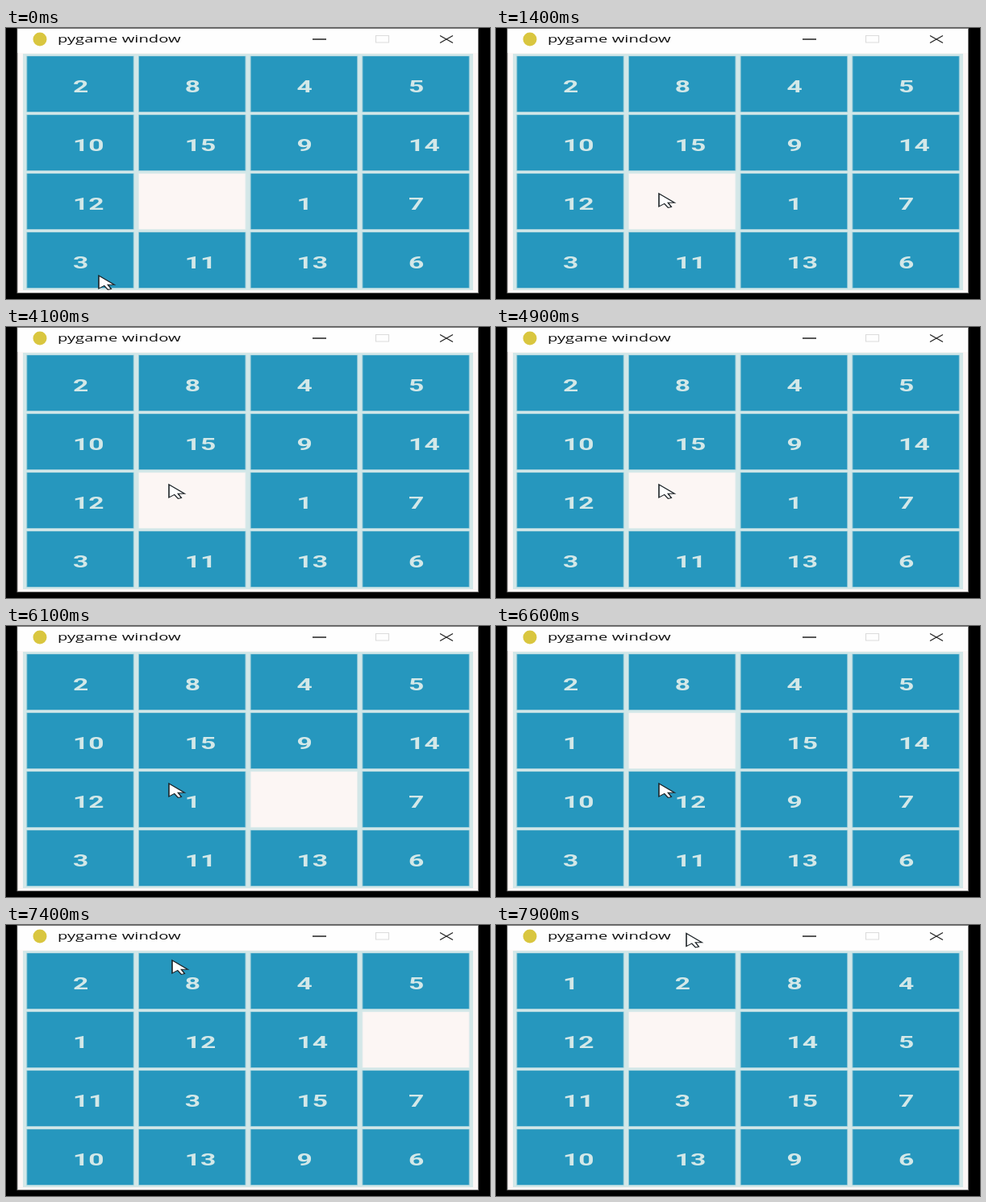
An HTML page with a canvas for the animation above (8 s loop, 600x337 px).

```html
<!DOCTYPE html>
<html lang="en">
<head>
<meta charset="utf-8">
<title>Sliding puzzle</title>
<style>
  html, body { margin: 0; width: 100%; height: 100%; overflow: hidden; background: #000; }
  canvas { display: block; }
</style>
</head>
<body>
<canvas id="stage" width="600" height="337"></canvas>
<script>
const ctx = document.getElementById('stage').getContext('2d');
const LOOP = 8000, STEP = 100;
const WIDE = 1.68; // the whole window is shown wider than it is tall

// Puzzle: rows of the start position (0 is empty) and the moves of the empty cell
const START = '2 8 4 5  10 15 9 14  12 0 1 7  3 11 13 6'.split(/ +/).map(Number);
const MOVES = 'RULDLUR' + 'DDLURDRUUR' + 'ULLLDR';
const SHIFT = { U: -4, D: 4, L: -1, R: 1 };
const MOVE_START = 5990, MOVE_TIME = 82;

// Pointer: home, then glides to further points; it is out of sight in the second glide
const HOME = { x: 115, y: 308 };
const GLIDES = [
  { from: 200, to: 1400, x: 202, y: 206 },
  { from: 2300, to: 4100, x: 202, y: 196, hidden: true },
  { from: 6700, to: 7400, x: 206, y: 44 },
  { from: 7400, to: 7900, x: 236, y: 10.5 }
];
const ARROW = new Path2D('M0 0V16L4 12.5L6.8 17.5L9.2 16.5L6.7 11.3H11.6Z');

function boardAt(t) {
  const cells = [...START];
  const count = Math.max(0, Math.floor((t - MOVE_START) / MOVE_TIME));
  let empty = cells.indexOf(0);
  for (const move of MOVES.slice(0, count)) {
    const next = empty + SHIFT[move];
    cells[empty] = cells[next];
    cells[next] = 0;
    empty = next;
  }
  return cells;
}

function pointerAt(t) {
  let { x, y } = HOME, hidden = false;
  for (const g of GLIDES) {
    const u = Math.min(1, Math.max(0, (t - g.from) / (g.to - g.from)));
    const k = u * u * (3 - 2 * u);
    x += (g.x - x) * k;
    y += (g.y - y) * k;
    if (g.hidden && t >= g.from && t < g.to) hidden = true;
  }
  return { x, y, hidden };
}

function rect(color, x, y, w, h) {
  ctx.fillStyle = color;
  ctx.fillRect(x, y, w, h);
}

// Runs draw() with its origin at x, y in the widened space
function widened(x, y, draw) {
  ctx.save();
  ctx.translate(x, y);
  ctx.scale(WIDE, 1);
  draw();
  ctx.restore();
}

function text(str, x, y, font, color) {
  widened(x, y, () => {
    ctx.font = font;
    ctx.fillStyle = color;
    ctx.fillText(str, 0, 0);
  });
}

function stroke(color, width, path) {
  ctx.strokeStyle = color;
  ctx.lineWidth = width;
  ctx.stroke(path);
}

function drawWindow() {
  rect('#000', 0, 0, 600, 337);
  rect('#777', 13.5, 0, 572.5, 330);
  rect('#fcf7f6', 14.5, 1, 570.5, 328);
  rect('#fefefe', 14.5, 1, 570.5, 30);
  ctx.fillStyle = '#d9c63f';
  ctx.beginPath();
  ctx.arc(42, 14, 8.5, 0, 7);
  ctx.fill();
  text('pygame window', 64, 18, '500 12px "Open Sans", sans-serif', '#111');
  stroke('#222', 1.3, new Path2D('M380 14H397M538 9.5L554 18.5M554 9.5L538 18.5'));
  stroke('#dcdcdc', 1.2, new Path2D('M458.5 9.5h16v8.5h-16z'));
}

function drawBoard(cells) {
  rect('#d3e7e8', 21, 32, 558, 294);
  cells.forEach((n, i) => {
    const x = 26 + i % 4 * 138.7, y = 35 + Math.floor(i / 4) * 73;
    const color = n ? '#2697be' : '#fcf6f4';
    rect(color + '60', x - 0.7, y - 0.3, 133.4, 69.9); // soft edge
    rect(color, x + 0.3, y + 0.2, 131.4, 68.9);
    if (n) text(n, x + 57, y + 45, 'bold 20px Roboto, sans-serif', '#d3e8e8');
  });
}

function drawPointer({ x, y, hidden }) {
  if (hidden) return;
  widened(x, y, () => {
    ctx.fillStyle = '#fff';
    ctx.fill(ARROW);
    stroke('#1c2226', 0.95, ARROW);
  });
}

function frame(now) {
  const t = Math.floor(now % LOOP / STEP) * STEP;
  drawWindow();
  drawBoard(boardAt(t));
  drawPointer(pointerAt(t));
  requestAnimationFrame(frame);
}
frame(performance.now());
</script>
</body>
</html>
```
